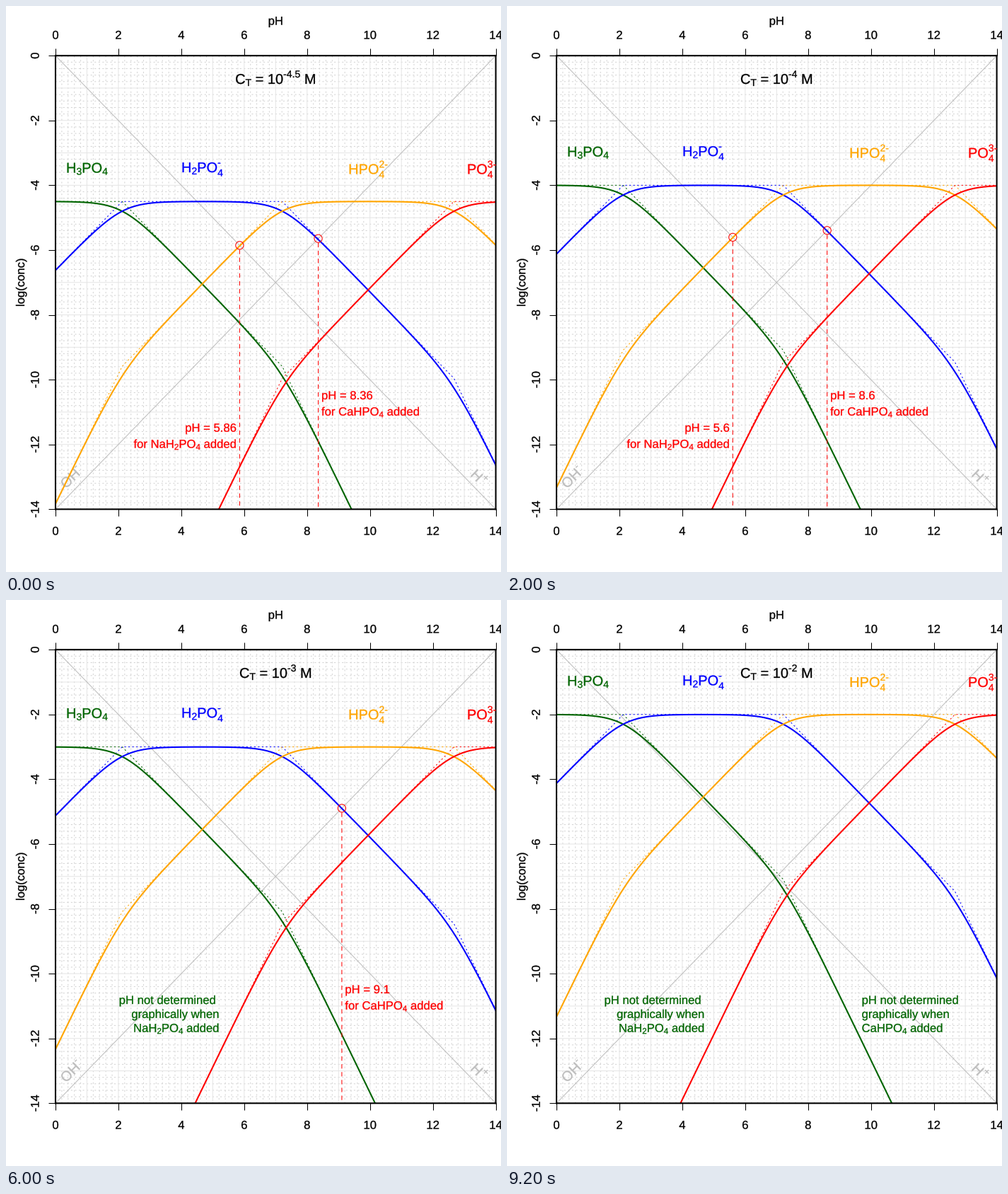
Animation, 700 px wide and 800 px high, one loop 10 s. Source, as a matplotlib script:

```python
import numpy as np
import matplotlib.pyplot as plt
from matplotlib.animation import FuncAnimation
from matplotlib.patches import Circle, PathPatch
from matplotlib.path import Path
from matplotlib.textpath import TextPath
from matplotlib.transforms import Affine2D

plt.rcParams["path.snap"] = False
plt.rcParams["lines.dash_capstyle"] = "round"

W, H, DPI = 700, 800, 100
LEFT, RIGHT, TOP, BOTTOM = 70, 692.6, 70.2, 711.3
FONT = {"family": "Liberation Sans"}
SMALL, LARGE = 12 * DPI / 72, 14.4 * DPI / 72   # text sizes in pixels
THIN, THICK = 0.75, 1.5                         # line widths in points
DOTTED = (0, (1 / THIN, 3 / THIN))
DASHED = (0, (4 / THIN, 4 / THIN))

PKA = [2.12, 7.21, 12.67]
PKW = 14
COLORS = ["darkgreen", "blue", "orange", "red"]
# name, pH of its centre, baseline shift in pixels
SPECIES = [
    ("H|_3|PO|_4", 1.0, 5.1),
    ("H|_2|PO|_4|^-", (PKA[0] + PKA[1]) / 2, 4.5),
    ("HPO|_4|^2-", (PKA[1] + PKA[2]) / 2, 6.9),
    ("PO|_4|^3-", 13.55, 6.9),
]
ACID, BASE = "NaH|_2|PO|_4| added", "CaHPO|_4| added"
# log of total concentration, acid pH readable, base pH readable
STATES = [(-4.5, True, True), (-4, True, True), (-3.8, True, True),
          (-3, False, True), (-2, False, False)]

fig = plt.figure(figsize=(W / DPI, H / DPI), dpi=DPI, facecolor="white")
ax = fig.add_axes([LEFT / W, 1 - BOTTOM / H,
                   (RIGHT - LEFT) / W, (BOTTOM - TOP) / H])
ax.set(xlim=(0, 14), ylim=(-14, 0))


def px(ph):
    return LEFT + (RIGHT - LEFT) * ph / 14


def py(logc):
    return TOP - (BOTTOM - TOP) * logc / 14


def pixels(x, y, rot=0):
    """Transform that puts pixel-sized shapes at stage point (x, y)."""
    move = Affine2D().rotate_deg(rot).translate(x, H - y).scale(1 / DPI)
    return move + fig.dpi_scale_trans


def advance(text, size):
    def end(s):
        return TextPath((0, 0), s, size=size, prop=FONT).get_extents().x1
    return end(text + "|") - end("|")


def label(x, y, markup, size=SMALL, color="black", align=0.5, rot=0, z=6,
          clip=False):
    """Text on a baseline; runs split by '|', '_' lowers and '^' raises."""
    runs = markup.split("|")
    paths, pen, stack = [], 0, 0
    for i, run in enumerate(runs):
        kind = run[0]
        if kind in "_^":
            run, scale = run[1:], 0.7 * size
            stacked = kind == "_" and runs[i + 1:i + 2] and runs[i + 1][0] == "^"
            lift = 0.45 if kind == "^" else -0.28 if stacked else -0.15
        else:
            scale, lift, stacked = size, 0, False
        start = stack if kind == "^" and stack else pen
        stack = pen if stacked else 0
        paths.append(TextPath((start, lift * size), run, size=scale, prop=FONT))
        pen = max(pen, start + advance(run, scale))
    shape = Path.make_compound_path(*paths)
    shape = shape.transformed(Affine2D().translate(-align * pen, 0))
    # a hairline outline gives the slightly heavy look of smoothed type
    return ax.add_artist(PathPatch(shape, fc=color, ec=color, lw=0.22, zorder=z,
                                   transform=pixels(x, y, rot), clip_on=clip))


def draw_backdrop():
    steps = np.arange(1, 70)
    minor = steps[steps % 5 != 0] / 5
    major = np.arange(1, 14)
    for at, color, style in ((minor, "lightgray", DOTTED),
                             (major, "#e6e6e6", "-")):
        look = dict(colors=color, linestyles=[style], lw=THIN, zorder=1,
                    capstyle="round")
        ax.vlines(at, -14, 0, **look)
        ax.hlines(-at, 0, 14, **look)
    ax.plot([0, 14], [0, -14], color="#bebebe", lw=THIN, zorder=2)
    ax.plot([0, 14], [-14, 0], color="#bebebe", lw=THIN, zorder=2)
    label(84.8, 683, "OH|^-", LARGE, "#bebebe", 0, 45, z=2)
    label(655.8, 663.3, "H|^+", LARGE, "#bebebe", 0, -45, z=2)

    ax.tick_params(top=True, labelbottom=False, labelleft=False,
                   length=7.2, width=THIN)
    ax.set_xticks(range(0, 15, 2))
    ax.set_yticks(range(-14, 1, 2))
    for spine in ax.spines.values():
        spine.set(linewidth=THICK, zorder=5.5, snap=False)
    for n in range(0, 15, 2):
        label(px(n), 46.6, str(n))
        label(px(n), 747.6, str(n))
        label(46.6, py(-n), str(-n), rot=90)
    label(px(7), 26.6, "pH")
    label(26, py(-7), "log(conc)", rot=90)


PH = np.linspace(0, 14, 701)
# log weight of each species relative to the fully protonated one
WEIGHTS = np.array([i * PH - sum(PKA[:i]) for i in range(4)])
TOTAL = np.log10((10 ** WEIGHTS).sum(axis=0))
LEADING = WEIGHTS.max(axis=0)


def two_places(value):
    return f"{round(round(value * 200) / 2) / 100:g}"


def marker(ph, logc, name, side):
    """Circle, drop line and caption; side is -1 for left, 1 for right."""
    ring = Circle((0, 0), 5.6, fill=False, ec="red", lw=THIN, zorder=5,
                  transform=pixels(px(ph), py(logc)))
    foot = logc - 6.5 / (BOTTOM - TOP) * 14
    drop, = ax.plot([ph, ph], [foot, -14], color="red", lw=THIN, ls=DASHED,
                    zorder=5)
    tx, align = px(ph + 0.1 * side), (1 - side) / 2
    row = -11 + 0.5 * side
    return [ax.add_artist(ring), drop,
            label(tx, py(row) + 4.9, "pH = " + two_places(ph),
                  color="red", align=align),
            label(tx, py(row - 0.5) + 4.9, "for " + name,
                  color="red", align=align)]


def refusal(ph, name, align):
    lines = ["pH not determined ", "graphically when", name]
    return [label(px(ph + 0.1), 571 + 19.8 * i, line,
                  color="darkgreen", align=align)
            for i, line in enumerate(lines)]


live = []


def draw(frame):
    while live:
        live.pop().remove()
    ct, acid_ok, base_ok = STATES[frame % len(STATES)]

    for weight, color, (name, ph, shift) in zip(WEIGHTS, COLORS, SPECIES):
        live.extend(ax.plot(PH, ct + weight - LEADING, color=color, lw=THIN,
                            ls=DOTTED, zorder=3))
        live.extend(ax.plot(PH, ct + weight - TOTAL, color=color, lw=THICK,
                            zorder=4))
        live.append(label(px(ph), py(ct + 1) + shift, name, LARGE, color,
                          clip=True))
    live.append(label(px(7), 110, f"C|_T| = 10|^{ct:g}| M", LARGE))

    acid = (PKA[1] - ct) / 2
    base = (PKW + ct + PKA[1]) / 2
    live.extend(marker(acid, -acid, ACID, -1) if acid_ok
                else refusal(acid, ACID, 1))
    live.extend(marker(base, base - PKW, BASE, 1) if base_ok
                else refusal(base, BASE, 0))
    return live


draw_backdrop()
anim = FuncAnimation(fig, draw, frames=len(STATES), interval=2000,
                     init_func=lambda: [], repeat=True, repeat_delay=0)
plt.show()
```
